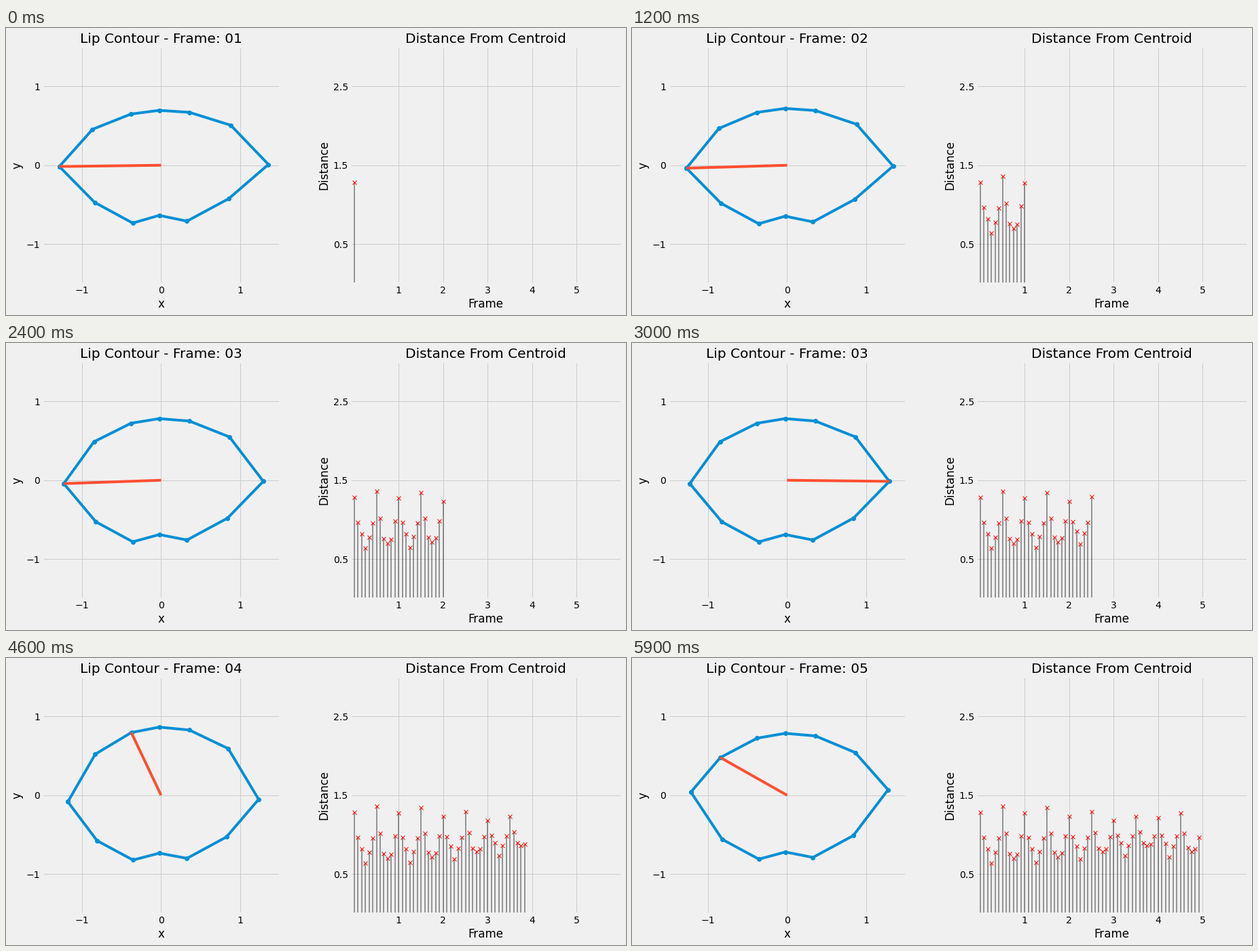
Recreate the animation shown at these times as a matplotlib script. Size 913 by 424 pixels, loop 6 s.

```python
import numpy as np
import matplotlib.pyplot as plt
from matplotlib.animation import FuncAnimation

plt.style.use("fivethirtyeight")

W, H, DPI = 913, 424, 72
BLUE, ORANGE = "#008fd5", "#fc4f30"

# Lips at rest: left corner, lower lip, right corner, upper lip.
REST = np.array([
    (-1.283, .013), (-.837, -.442), (-.356, -.704), (-.021, -.607),
    (.330, -.680), (.858, -.395), (1.360, .039), (.884, .536),
    (.361, .700), (-.021, .725), (-.378, .678), (-.863, .485)])
OPENING = [0, .13, .52, 1, .65]
CORNER_LIFT = [0, -.015, .01, 0, .12]

POINTS = len(REST)
TOTAL = POINTS * len(OPENING)


def lips(opening, lift):
    """Open the mouth: pull the corners in, push the lips apart, recentre."""
    x, y = REST.T
    x = x - .05 * opening * x**3
    y = y + opening * (.175 * y + .21 * y**2)
    y[[0, POINTS // 2]] += lift
    return np.column_stack([x - x.mean(), y - y.mean()])


contours = [lips(*pose) for pose in zip(OPENING, CORNER_LIFT)]
times = np.arange(TOTAL) / POINTS
dists = np.linalg.norm(np.concatenate(contours), axis=1)
stems = [[(t, 0), (t, d)] for t, d in zip(times, dists)]

fig = plt.figure(figsize=((W + 1e-6) / DPI, (H + 1e-6) / DPI), dpi=DPI)


def add_axes(left, right, top=28, bottom=377.5):
    """Place axes by their edges in pixels from the top left corner."""
    return fig.add_axes([left / W, 1 - bottom / H,
                         (right - left) / W, (bottom - top) / H])


lip = add_axes(53.6, 403.1)
title = lip.set_title("Lip Contour - Frame: 01")
outline, = lip.plot([], [], "o-", color=BLUE)
radius, = lip.plot([], [], color=ORANGE)
lip.set(xlim=(-1.5, 1.5), ylim=(-1.5, 1.5), xlabel="x", ylabel="y",
        xticks=[-1, 0, 1], yticks=[-1, 0, 1])

graph = add_axes(507.35, 905.85)
bars = graph.vlines([], 0, [], colors="k", alpha=0.5, linewidths=1.5)
marks, = graph.plot([], [], "rx")
graph.set(xlim=(-1 / POINTS, 6), ylim=(0, 3), xlabel="Frame", ylabel="Distance",
          xticks=range(1, 6), yticks=[0.5, 1.5, 2.5],
          title="Distance From Centroid")


def update(i):
    k, p = divmod(i, POINTS)
    shape = contours[k]
    title.set_text(f"Lip Contour - Frame: {k + 1:02d}")
    outline.set_data(*np.vstack([shape, shape[:1]]).T)
    radius.set_data([0, shape[p, 0]], [0, shape[p, 1]])
    bars.set_segments(stems[:i + 1])
    marks.set_data(times[:i + 1], dists[:i + 1])
    return title, outline, radius, bars, marks


anim = FuncAnimation(fig, update, frames=TOTAL, interval=100,
                     repeat=True, repeat_delay=0, blit=False)
plt.show()
```
